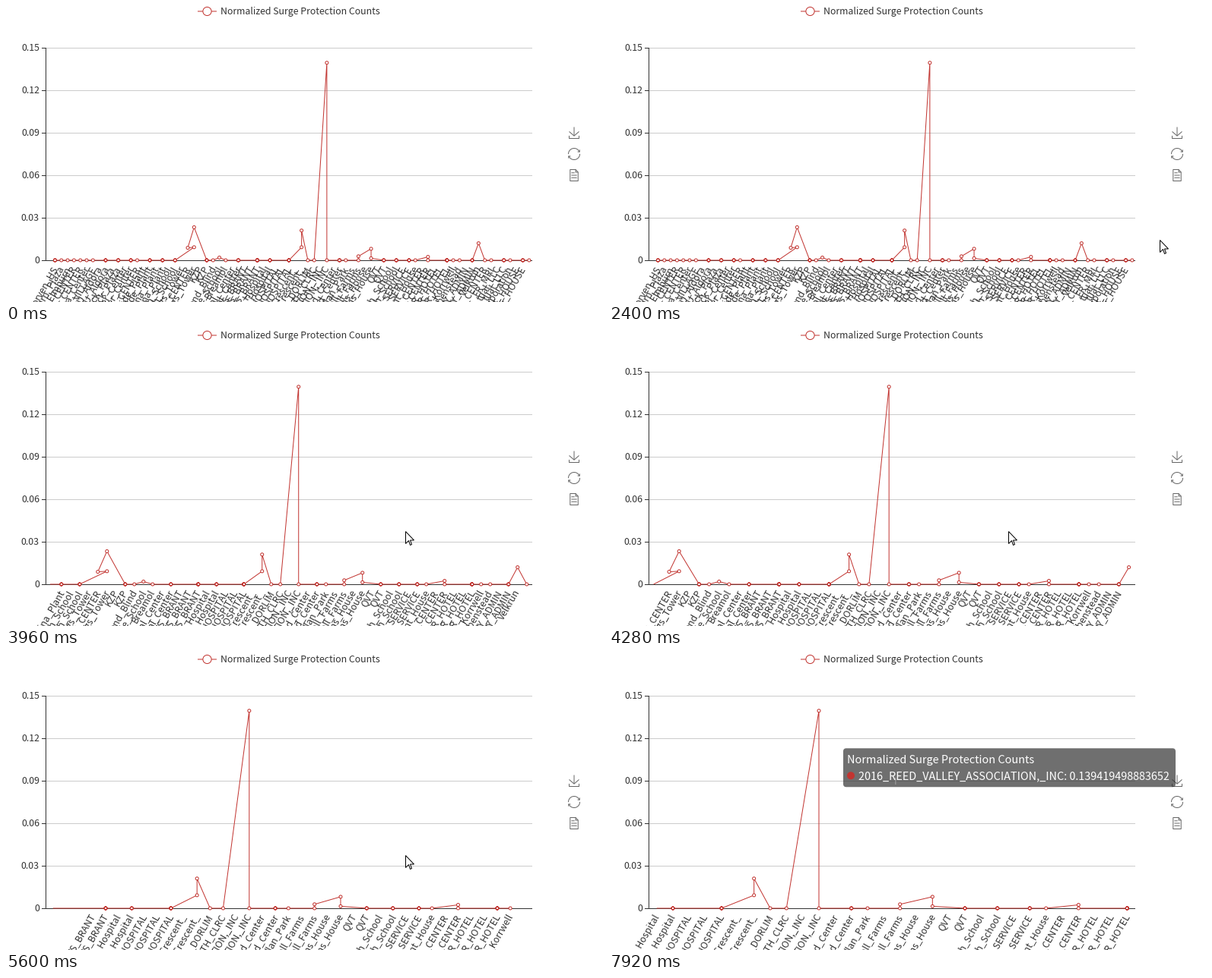
Recreate the animation shown at these times as a matplotlib script. Size 785 px wide and 390 px high, loop 8 s.

```python
import math

import matplotlib.pyplot as plt
import numpy as np
from matplotlib.animation import FuncAnimation
from matplotlib.patches import Circle, FancyBboxPatch, PathPatch, Polygon
from matplotlib.path import Path

W, H, DPI = 785, 390, 100
PX = 72 / DPI                      # points per pixel
STEP, COUNT = 40, 200              # ms per frame, frames per loop
LEFT, RIGHT, TOP, BASE = 52, 692, 55, 335
RED, DARK, GRID, ICON = "#c23531", "#333333", "#cccccc", "#666666"
FONT = "Noto Sans CJK JP"
SMALL, LARGE = 12.35, 14.42        # text sizes in pixels
TITLE = "Normalized Surge Protection Counts"
TIP_TEXT = "2016_REED_VALLEY_ASSOCIATION,_INC: 0.139419498883652"

# Visible ends of the category names, "*n" repeats a name.
RUNS = """Morven_HS*2 Tarn_Plaza Rs_Elmhurn AL_CENTER TH_CENTER ata_Center
M_VILLAGE SU_Aldora*2 rock_Plaza*2 ter_Center*2 RED_CENTER side_Plant*2
olina_Plant*2 rth_School*2 ings_Tower R_CENTER ings_Tower KZP*2 and_Blind
dle_School Breamol ical_Center*2 TS_BRANT*3 ns_Hospital*2 _HOSPITAL*3
_Crescent_*2 L_DORLIM RTH_CLRC TION,_INC*2 and_Center*2 llan_Park
hall_Farms*2 ems_House*2 QVT*2 ish_School*2 R_SERVICE*2 ent_House
ER_CENTER*2 OUR_HOTEL*3 s_Korrwell Harbenstead RY_ADMIN*2 Velkrun
VER_CENTER ER_MRI tual_LLC*2 rporation HASE_HOUSE*2 R_HOUSE"""
NAMES = []
for run in RUNS.split():
    name, _, times = run.partition("*")
    NAMES += [name] * int(times or 1)

# The few categories that rise above zero.
SPIKES = {21: .0092, 22: .0088, 23: .0233, 27: .0019, 39: .0092, 40: .021,
          43: .1394, 49: .0028, 50: .0081, 51: .0014, 59: .0024, 68: .012}
# A repeated name puts its points at the last category of that name.
LAST = {name: i for i, name in enumerate(NAMES)}
POINT_CAT = np.array([LAST[name] for name in NAMES])
POINT_Y = np.array([BASE - SPIKES.get(i, 0) / .15 * (BASE - TOP)
                    for i in range(len(NAMES))])

# Wheel bursts: first click, gap, clicks
BURSTS = [(3320, 152, 4), (4140, 195, 3), (5530, 45, 3)]
CLICKS = [start + gap * i for start, gap, n in BURSTS for i in range(n)]
ZOOM_MS, ZOOM = 300, 1.1
ANCHOR = (525 - LEFT) / (RIGHT - LEFT)

# Pointer moves: start, end, destination
ENTRY = (700, 388)
MOVES = [(400, 1000, (766, 285)), (1300, 2400, (724, 308)),
         (2400, 2800, (519, 253)), (3000, 3120, (525, 265)),
         (6680, 6720, (507, 268)), (6720, 7640, (220, 58)),
         (7640, 7800, (276, 75)), (7800, 7920, (377, 167))]
TIP_SHOWN, BEAM_SHOWN = 7880, 7920


def progress(t, start, length):
    return min(max((t - start) / length, 0), 1)


def category_range(level):
    shrink = 1 - ZOOM ** -level
    top = len(NAMES) - 1
    return (math.floor(top * ANCHOR * shrink),
            math.floor(top * (1 - (1 - ANCHOR) * shrink)))


def target(level):
    lo, hi = category_range(level)
    band = (RIGHT - LEFT) / (hi - lo + 1)
    return np.array([LEFT - lo * band, band])


def layout(t):
    """Return zoom level and the eased (origin, band width) at time t."""
    state, level = target(0), 0
    for n, (start, end) in enumerate(zip(CLICKS, CLICKS[1:] + [math.inf]), 1):
        if t < start:
            break
        k = progress(min(t, end), start, ZOOM_MS)
        state = state + (target(n) - state) * (1 - (1 - k) ** 3)
        level = n
    return level, state


fig = plt.figure(figsize=(W / DPI, H / DPI), dpi=DPI, facecolor="white")
ax = fig.add_axes([0, 0, 1, 1])
ax.set(xlim=(0, W), ylim=(H, 0))
ax.axis("off")


def stroke(x, y, color, **kw):
    return ax.plot(x, y, color=color, lw=PX, snap=False,
                   solid_capstyle="butt", **kw)[0]


def write(x, y, text, size=SMALL, color=DARK, **kw):
    return ax.text(x, y, text, fontsize=size * PX, color=color, family=FONT,
                   va="baseline", **kw)


def draw_icon(cy, parts):
    """Stroke parts scaled to a 15 px box on the toolbox column."""
    parts = [np.array(part, float) for part in parts]
    every = np.vstack(parts)
    low, high = every.min(axis=0), every.max(axis=0)
    for part in parts:
        p = (part - (low + high) / 2) * 15 / (high - low).max()
        stroke(747 + p[:, 0], cy + p[:, 1], ICON, zorder=4)


# Frame of the chart; half pixels keep the lines crisp
for i in range(6):
    y = BASE - 56 * i
    if i:
        stroke([LEFT, RIGHT], [y + .5] * 2, GRID, zorder=1)
    stroke([LEFT - 5, LEFT], [y + .5] * 2, DARK, zorder=2)
    write(44, y + 4, f"{.03 * i:.2f}" if i else "0", ha="right")
stroke([LEFT + .5] * 2, [TOP, BASE + 1], DARK, zorder=2)
stroke([LEFT, RIGHT], [BASE + .5] * 2, DARK, zorder=2)

# Legend
stroke([252, 277], [7, 7], RED)
ax.add_patch(Circle((264.5, 7), 5.6, fc="white", ec=RED, lw=PX, zorder=3))
write(281.5, 11, TITLE)

# Toolbox: download, restore, document
draw_icon(167, [[(0, 23), (25, 45), (50, 23)], [(25, 45), (25, 0)],
                [(0, 44), (0, 58), (50, 58), (50, 44)]])
angle = np.radians(np.linspace(-20, -181, 40))
arc = 28 * np.column_stack([np.cos(angle), np.sin(angle)])
hook = np.array([(17, -11), (27, -11), (27, -21)])
draw_icon(195, [arc, hook, -arc, -hook])
rows = [[(6, y), (33 if y > 16 else 22, y)] for y in (16, 28, 40)]
draw_icon(223, [[(0, 0), (0, 56), (39, 56), (39, 13), (27, 0), (0, 0)],
                [(27, 0), (27, 13), (39, 13)]] + rows)

# Moving parts
line = stroke([], [], RED, zorder=5, solid_joinstyle="bevel")
RING = Path.circle(radius=2)
dots = PathPatch(RING, fc="white", ec=RED, lw=PX, zorder=6, snap=False)
ax.add_patch(dots)
labels = [write(0, 0, name, rotation=60, rotation_mode="anchor", ha="right")
          for name in NAMES]

tip_box = FancyBboxPatch((0, 0), 437, 51, fc=(.196, .196, .196, .7), ec="none",
                         boxstyle="round,pad=0,rounding_size=4", zorder=10)
tip_dot = Circle((0, 0), 5, fc=RED, ec="none", zorder=11)
ax.add_patch(tip_box)
ax.add_patch(tip_dot)
tip_head = write(0, 0, TITLE, LARGE, "white", zorder=11)
tip_body = write(0, 0, TIP_TEXT, LARGE, "white", zorder=11)
tip = [tip_box, tip_dot, tip_head, tip_body]

beam = write(377, 172, "I", SMALL, GRID, ha="center", alpha=.5, zorder=12)
ARROW = np.array([(0, 0), (0, 16), (4, 12), (6, 18), (8, 17), (6, 11.5),
                  (11, 11.5)]) + .5
pointer = Polygon(ARROW, closed=True, fc="white", ec="black", lw=PX,
                  zorder=13, snap=False)
ax.add_patch(pointer)


def place_chart(t):
    level, (origin, band) = layout(t)
    lo, hi = category_range(level)
    goal_band = target(level)[1]

    # End labels give way when neighbours would overlap.
    trim = int(goal_band * math.sin(math.pi / 3) < 12)
    for i, label in enumerate(labels):
        label.set_visible(lo + trim <= i <= hi - trim)
        label.set_position((origin + band * (i + .5) + 3.7, 345.2))

    keep = (POINT_CAT >= lo) & (POINT_CAT <= hi)
    cats = POINT_CAT[keep]
    xs, ys = origin + band * (cats + .5), POINT_Y[keep]
    rings = [Path(RING.vertices + spot, RING.codes) for spot in zip(xs, ys)]
    dots.set_path(Path.make_compound_path(*rings))

    # Without a point at either end the line still reaches that category.
    if level and cats[0] > lo:
        xs, ys = np.r_[LEFT + goal_band / 2, xs], np.r_[BASE, ys]
    if cats[-1] < hi:
        xs, ys = np.r_[xs, RIGHT - goal_band / 2], np.r_[ys, BASE]
    line.set_data(xs, ys)


def place_tip(t):
    for part in tip:
        part.set_visible(t >= TIP_SHOWN)
    k = .625 * progress(t, TIP_SHOWN, STEP)
    x, y = 328 - 32 * k, 173 - 78 * k
    tip_box.set_bounds(x, y, 437, 51)
    tip_dot.center = (x + 10, y + 36)
    tip_head.set_position((x + 5, y + 20))
    tip_body.set_position((x + 20, y + 41))


def place_pointer(t):
    spot = np.array(ENTRY, float)
    for start, end, goal in MOVES:
        spot += (np.array(goal) - spot) * progress(t, start, end - start)
    pointer.set_xy(ARROW + np.round(spot))
    pointer.set_visible(400 <= t < 1240 or 2400 <= t < BEAM_SHOWN)
    beam.set_visible(t >= BEAM_SHOWN)


def update(frame):
    t = frame * STEP
    place_chart(t)
    place_tip(t)
    place_pointer(t)
    return []


anim = FuncAnimation(fig, update, frames=COUNT, interval=STEP, repeat=True,
                     repeat_delay=0, init_func=lambda: update(0), blit=False)
plt.show()
```
